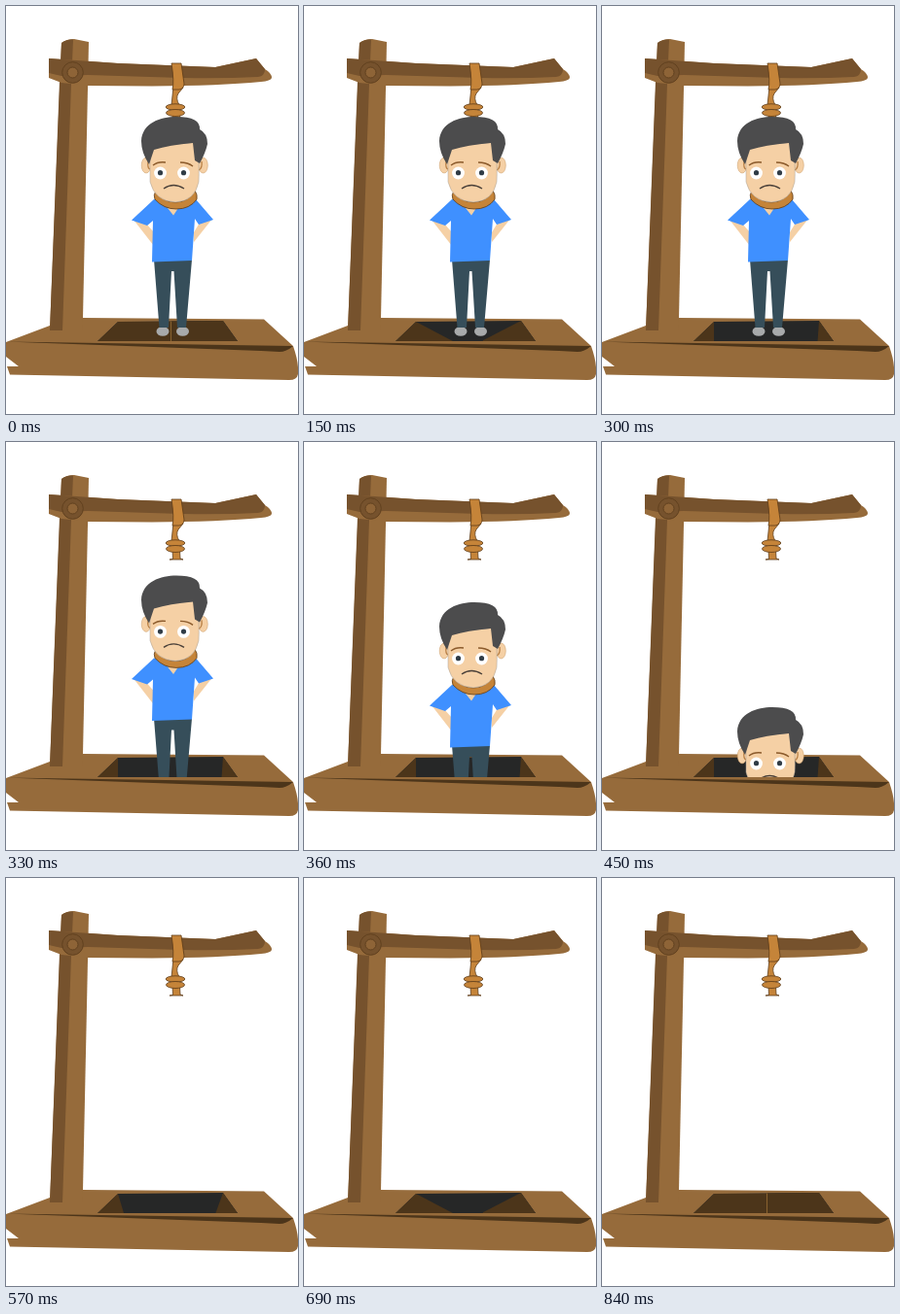
An HTML page with a canvas that plays this animation: 300 px wide and 420 px high, repeating every 990 ms.

```html
<!DOCTYPE html>
<html lang="en">
<head>
<meta charset="utf-8">
<title>Trapdoor</title>
<style>
  html, body { margin: 0; width: 100%; height: 100%; overflow: hidden; background: #fff; }
  canvas { display: block; width: 300px; height: 420px; }
</style>
</head>
<body>
<canvas id="stage" width="300" height="420"></canvas>
<script>
const ctx = document.getElementById('stage').getContext('2d');
const LOOP = 990, STEP = 30, FLOOR = 345;
const wood = '#966b3b', woodDark = '#76522d', woodDeep = '#4c351a', pit = '#262727';
const rope = '#c58439', ropeLine = '#5d3b18';
const skin = '#f5d0a5', hair = '#4c4c4d', shirt = '#3f90ff', trousers = '#364e5a';

function paint(shape, fill, line, width = 1) {
  const path = shape instanceof Path2D ? shape : new Path2D(shape);
  if (fill) { ctx.fillStyle = fill; ctx.fill(path); }
  if (line) { ctx.strokeStyle = line; ctx.lineWidth = width; ctx.stroke(path); }
}

function oval(x, y, rx, ry, fill, line, width) {
  const path = new Path2D();
  path.ellipse(x, y, rx, ry, 0, 0, Math.PI * 2);
  paint(path, fill, line, width);
}

function drawBase() {
  paint('M0 346 L45 329 L79 321 L265 322.500 L295 350 Q301 367 300 379 Q299 385 291 385 L4 379.500 L1 371 L13 371 L0 361 Z', wood);
  paint('M0 345.500 L295 350 Q288 356 281 356 L262 355 Z', woodDeep);
}

function drawGallows() {
  paint('M57 38 Q62 34 70 34 L85 37 L79 322 L78 334 L45 334 Z', wood);
  paint('M57 38 Q62 34 69 34.500 L67 80 L58 334 L45 334 L55 78 Z', woodDark);
  paint('M44 54 L115 59 L215 63 L257 54 L266 65 Q273 69 273 74 Q272 77 262 78 Q220 82 150 82.500 L84 82 L57 79 L44 74 Z', wood);
  paint('M44 54 L115 59 L215 63 L257 54 L266 65 Q266 72 259 73 Q220 75 180 74 L84 71 L57 72 L44 69 Z', woodDark);
  oval(68.5, 68.5, 10.8, 10.8, woodDark, '#61411f', 1);
  oval(68.5, 68.5, 5.5, 5.5, '#8e6437', '#61411f', 1);
}

function drawRope() {
  paint('M171 111 L171.500 120.500 L168 121 L182 121 L179 120 L178.500 111 Z', rope, ropeLine, 0.8);
  paint('M172 83 L170 102 L178 102 Q174 95 177 90 L182 84 Z', rope, ropeLine, 0.8);
  paint('M170 59 L180 59 L183 80 Q183 85 178 86 L171 86 Q173 78 170 59 Z', rope, ropeLine, 0.8);
  oval(174, 104, 9.8, 3.2, rope, ropeLine, 0.8);
  oval(174, 110, 9.5, 3.5, rope, ropeLine, 0.8);
}

// open: 0 is shut, 1 is hanging straight down
function drawTrapdoor(open) {
  ctx.save();
  ctx.clip(new Path2D('M115 325 L223 324 L238 345 L94 345 Z'));
  ctx.fillStyle = pit;
  ctx.fillRect(90, 320, 150, 25);
  const angle = open * Math.PI / 2;
  const reach = 54 * Math.cos(angle), drop = 28.5 * Math.sin(angle);
  const leaf = (hinge, front, edge, top) =>
    paint(`M${hinge} ${top} L${edge} ${top + drop} L${edge} 400 L${front} 400 L${front} 345 Z`, woodDeep);
  leaf(115, 94, 115 + reach, 325);
  leaf(223, 238, 223 - reach - 2 * open, 324);
  ctx.restore();
  if (open === 0) paint('M169.500 324.500 V345', null, '#89632f', 1);
}

function drawFace() {
  oval(144, 164, 4.8, 8, skin, '#c99b67', 0.5);
  oval(202.5, 164, 4.8, 8, skin, '#c99b67', 0.5);
  paint('M146 160 Q145 167 148 168 M201 160 Q202 167 198 169', null, '#b98045', 1.3);
  paint('M148 145 L196 140 Q199 165 198 181 Q194 201 174 202 Q153 201 148 181 Z', skin, '#a8a39b', 0.5);
  paint('M147 163 Q139 151 139 139 C140 120 159 114 175 114 Q200 114 199 127 Q207 131 207 142 Q205 151 199 162 L194 159 L192 141 Q168 143 152 148 Z', hair);
  for (const x of [158.5, 182.5]) {
    oval(x, 172, 6.4, 6.4, '#fff');
    oval(x, 171.7, 2.6, 2.6, '#303c46');
  }
  paint('M151 164 Q156 160 164 161 M179 161 Q187 161 192 165', null, '#8b5a2b', 1.4);
  paint('M162 188 Q172 181 183 188', null, '#4a4039', 1.4);
}

function drawMan(fall) {
  ctx.save();
  ctx.beginPath();
  ctx.rect(0, 0, 300, FLOOR);
  ctx.clip();
  ctx.translate(0, fall);
  oval(161, 335, 6.5, 4.8, '#a8aaab');
  oval(181.5, 335, 6.5, 4.8, '#a8aaab');
  paint('M152 261 L191 261 L185 331 L176 331 L172.500 273 L170 273 L167 331 L157.500 331 Z', trousers);
  paint('M131 220 L152 247 L152 233 L144 224 Z M212 219 L193 243 L193 233 L199 223 Z', skin);
  paint('M152 199 L129 220.500 L145 226 L151 221 L150 263.500 L191 262 L194 219 L198 225 L213 220 L195 199 Z', shirt);
  paint('M166 208 L177 208 L172 215.500 Z', skin);
  paint('M154 190 Q151 195 153 199 Q162 209 175 209 Q189 209 196 199 Q197 194 194 190 Q187 202 174 202 Q161 202 154 190 Z', rope, ropeLine, 0.8);
  drawFace();
  ctx.restore();
}

function render(time) {
  const tick = Math.floor((time % LOOP) / STEP);
  const open = tick < 18 ? Math.min(tick, 10) / 10 : Math.max(28 - tick, 0) / 10;
  const n = Math.max(tick - 10, 0);

  ctx.fillStyle = '#fff';
  ctx.fillRect(0, 0, 300, 420);
  drawBase();
  drawGallows();
  drawTrapdoor(open);
  drawRope();
  if (tick < 16) drawMan(21.3 * n + 2.1 * n * n);
}

const start = performance.now();
function frame() {
  render(performance.now() - start);
  requestAnimationFrame(frame);
}
frame();
</script>
</body>
</html>
```
